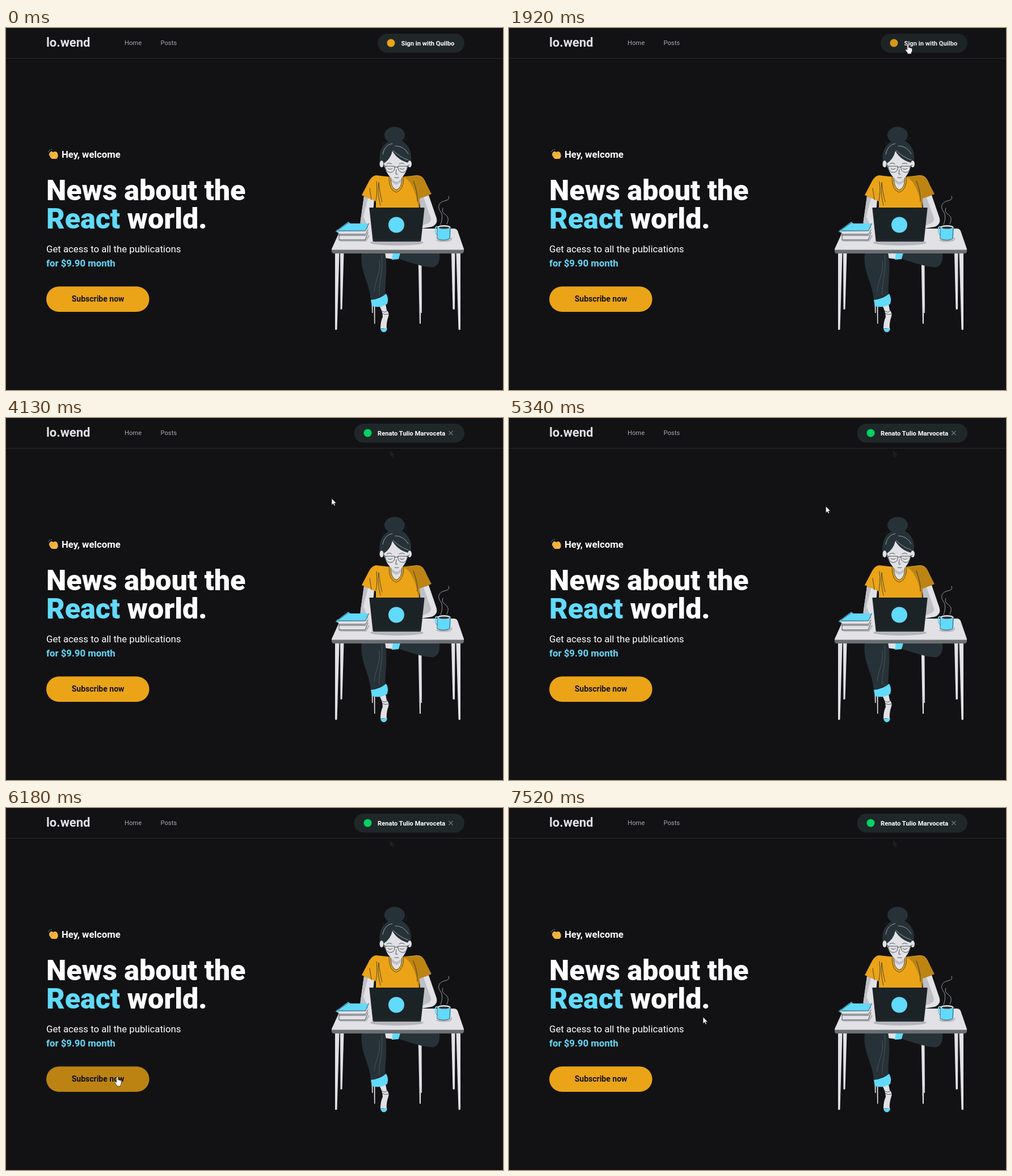
Recreate the animation shown at these times as an HTML page. Size 876 px wide and 639 px high, loop 8 s.

```html
<!DOCTYPE html>
<html lang="en">
<head>
<meta charset="utf-8">
<title>News landing page</title>
<style>
html, body { margin: 0; height: 100%; overflow: hidden; background: #121214; }
svg { display: block; width: 876px; height: 639px; font-family: Roboto, sans-serif; }
.b { font-weight: 700; }
.skin { fill: #e1e1e6; }
.shade { fill: #bfc0c5; }
.dark { fill: #263238; }
.gold { fill: #eba417; }
.ochre { fill: #bd8413; }
.cyan { fill: #61dafb; }
.ink { fill: none; stroke: #263238; stroke-width: .8; stroke-linecap: round; stroke-linejoin: round; }
.pale { fill: none; stroke: #b4babe; stroke-width: .8; stroke-linecap: round; }
</style>
</head>
<body>
<svg viewBox="0 0 876 639">
  <defs>
    <path id="arrowShape" d="M0 0V11.6L2.7 9.1 4.5 13 6.3 12.2 4.6 8.4H8.2Z"/>
  </defs>

  <!-- Header -->
  <path d="M0 53.5H876" stroke="#29292e"/>
  <text x="71" y="33" font-size="22" class="b" fill="#e1e1e6">lo.wend</text>
  <g font-size="11.2" fill="#a8a8b3">
    <text x="209" y="30">Home</text>
    <text x="272.5" y="30">Posts</text>
  </g>
  <g id="signIn" class="b" font-size="11.2" fill="#fff">
    <rect x="655" y="10" width="153" height="33.4" rx="16.7" fill="#1f2729"/>
    <circle cx="678.5" cy="26.5" r="7" class="gold"/>
    <text x="696.5" y="30.8">Sign in with Quilbo</text>
  </g>
  <g id="account" class="b" font-size="11.2" fill="#fff">
    <rect x="613.5" y="10" width="194.5" height="33.4" rx="16.7" fill="#1f2729"/>
    <circle cx="637.5" cy="26.5" r="7" fill="#04d361"/>
    <text x="655" y="30.8">Renato Tulio Marvoceta</text>
    <path d="M780.5 23l7 7m0-7l-7 7" stroke="#737380" stroke-width="1.3"/>
  </g>

  <!-- Hero copy -->
  <path d="M78 219q1-2 3-1l2 1 3-1q4 0 5 4 2 6-2 9H81q-3-2-4-5-2-2-1-3 0-3 2-4z" fill="#f5b63f"/>
  <path d="M77 223l5 4m-4-7l6 5m-2-6l5 4" stroke="#d98e2b" stroke-width=".8"/>
  <path d="M74.500 219l1.500-2m0-1l2-1m1 0l2-.5" stroke="#4f9bd8"/>
  <g fill="#fff">
    <text x="98" y="229" font-size="16.75" class="b">Hey, welcome</text>
    <g font-size="50.2" font-weight="900">
      <text x="71" y="304">News about the</text>
      <text x="71" y="354"><tspan class="cyan">React</tspan> world.</text>
    </g>
    <text x="71" y="396" font-size="16.75">Get acess to all the publications</text>
    <text x="71" y="421" font-size="16.75" class="b cyan">for $9.90 month</text>
  </g>
  <g id="subscribe">
    <rect x="71" y="456.3" width="181.5" height="44.7" rx="22.35" class="gold"/>
    <text x="115.7" y="483.3" font-size="14" class="b" fill="#121214">Subscribe now</text>
  </g>

  <!-- Legs, chair and table legs -->
  <g class="skin">
    <path d="M726.500 400h5.500l-1 122h-2zM730 416h2.500l.5 87h-1.500zM644.500 487h2v16h-1.500zM648.500 487h2v35h-1.500z"/>
    <path d="M580 397h7.500l-4 135q-2 2-3.500 0zM589 397h6.500l-3 99q-2 2-3 0zM785 397h6.500l-.5 99q-2 2-3.500 0zM793.500 397h7.500v135q-2 2-3.500 0z"/>
    <path d="M667 397h16l-1 11-14-2zM658 490l11-3 2 11q5 5 3 11-4 12-3 22l-11-1q0-12 4-20 0-9-6-20z"/>
  </g>
  <path d="M686 397h78q2 21-10 25-13 2-60-14z" class="dark"/>
  <path d="M682 397h13l-3 11-12 1z" class="cyan"/>
  <path d="M627 397h41c6 28-1 55 1 74l-26 10c-2-32-20-51-16-84z" class="dark"/>
  <path d="M662 401c4 28-6 50-4 70m-9-6c2-22 12-32 9-54" class="pale" opacity=".3"/>
  <path d="M643 480q17-2 27-11 5 8 2 18-11 8-27 4z" class="cyan"/>
  <path d="M662 499q6 5 10 0m-9 5q5 3 11 1" class="ink"/>
  <path d="M660 530q6 2 12 0-1 7-6 7t-6-7z" class="cyan"/>

  <!-- Arms and shirt -->
  <path d="M631 297l18 7-5 50-12 0q-9-2-7-15z" class="skin"/>
  <path d="M631 297l7 3-8 33 9 21-7 0q-9-2-7-15z" class="shade"/>
  <path d="M729 301l16-6 13 38q5 13-8 18l-18 3z" class="skin"/>
  <path d="M729 301l7-2 12 34q4 8-5 12l-10 4z" class="shade"/>
  <path d="M652 260q-7 1-12 10l-13 25 25 11v14h76l1-19 20-8-11-24q-5-10-15-9l-35 4z" class="gold"/>
  <path d="M700 263l23-2q10-1 15 9l12 23-21 8-2 17q-2-23-13-42-5-9-14-13z" class="ochre"/>
  <path d="M657 273q-3 17 3 40m-7-42q2 20-1 34m-11-22l3 20m13-30q2 20 6 34m55-37q8 20 7 36" class="ink"/>
  <path d="M678 257h20q1 25-10 28-12-4-10-28z" class="skin"/>
  <path d="M678 260q10 20 20 0l-1 12-9 5-9-5z" class="shade"/>
  <path d="M675 263q0 24 13 27 13-4 13-27m-23 0q0 20 10 23 10-3 10-23" class="ink"/>

  <!-- Head -->
  <ellipse cx="685" cy="189" rx="18" ry="14.500" class="dark"/>
  <path d="M659 238c-4-24 10-41 28-41s31 19 26 41l-9 8h-37z" class="dark"/>
  <ellipse cx="662" cy="240" rx="3.500" ry="6" class="skin"/>
  <ellipse cx="711.500" cy="240" rx="3.500" ry="6" class="skin"/>
  <path d="M681 217q9 16 28 21-1 18-18 33h-5q-17-12-20-32 12-8 15-22z" class="skin"/>
  <path d="M682 216q12 12 27 17m-23-25q15 0 23 14m-45 1q3-17 17-19" class="pale"/>
  <path d="M703 198q4 2 3-5M668 202q-4-1-4 4" class="ink"/>
  <g class="ink">
    <path d="M669 244h16v4q-1 7-8 7-7-1-8-7zM691 244h16v4q-2 7-8 7-7-1-8-7zM685 246q3-2 6 0M665 242l4 2m38 0l4-2"/>
    <path d="M673 248q4 3 8 0m13 0q4 3 8 0M688 250l-1 8 3 0m-5 6q4 1 7 0M671 240q5-3 9 0m13 0q5-3 9 0"/>
  </g>

  <!-- Table and objects -->
  <path d="M595 354h194q5 0 7 4l11 32v3H574v-3l14-31q2-5 7-5z" class="skin"/>
  <path d="M574 391.500h233v3q-1 3.500-4 3.500H578q-4 0-4-4z" fill="#6b6f73"/>
  <ellipse cx="689" cy="379" rx="47" ry="5" fill="#b5b6bb"/>
  <path d="M585 374h48l6-9 2 2-6 10h-45zM757 374h25l4-5q2 7-8 8-16 2-21-3z" fill="#b5b6bb"/>
  <path d="M587 361h51l-5 13h-46zM583 356h54l-3 8h-48z" class="skin"/>
  <path d="M587 365v9h46l5-13M587 366h47m-50-7l3 5h47l4-8" class="ink"/>
  <path d="M580.500 359l23-17 3 3h33l-6 13-46 1-3 2z" class="cyan"/>
  <path d="M580.500 360l24-17m-18 15h47l6-13" class="ink"/>
  <path d="M641 317h95.500q1.500 0 1 2l-6 56q0 2-2 2h-81q-2 0-2-2l-6-56q-.5-2 .5-2z" fill="#1b2326"/>
  <path d="M646 375h85" stroke="#353f44" stroke-width=".8"/>
  <circle cx="688" cy="347.500" r="14" class="cyan"/>
  <path d="M762 351h-3q-2 0-2 3v7q1 4 5 4" fill="none" stroke="#61dafb" stroke-width="2"/>
  <path d="M760 351h24l-1 21q-11 5-22 0z" class="cyan"/>
  <ellipse cx="772" cy="351.500" rx="11.500" ry="3.500" class="skin"/>
  <ellipse cx="772" cy="352.500" rx="9.500" ry="2" class="dark"/>
  <path d="M760 352v20q11 5 22 0l1-20" class="ink"/>
  <path d="M780 297q3 6-6 8c-12 2-14 12-8 19 4 6 3 15 0 23m4-29q-3 7 4 11 9 6 3 17" class="pale"/>

  <!-- Pointer -->
  <use id="trace" href="#arrowShape" x="677" y="57" fill="#202023" stroke="#1a1a1c"/>
  <g id="pointer" stroke="#222" stroke-width=".7" stroke-linejoin="round">
    <use id="arrow" href="#arrowShape" fill="#fff"/>
    <path id="hand" fill="#fff" d="M-1.300 1Q0-.8 1.300 1V6q1.500-1 2.200.4 1.600-.7 2 .7 1.500-.6 2 1v4l-1.500 3v1.900H-.7v-1.700L-4.300 10.300Q-4.400 8.300-2.700 9l1.400 1.400z"/>
  </g>
</svg>
<script>
const LOOP = 8000, STEP = 70;
const el = id => document.getElementById(id);
const clamp = v => Math.min(1, Math.max(0, v));
const ease = p => p * p * (3 - 2 * p);
const show = (id, on) => { el(id).style.display = on ? "" : "none"; };

// Pointer route: time, x, y
const route = [
  [330, 689, 478], [1090, 330, 154], [1370, 658, 107], [1570, 658, 107],
  [1850, 703, 29], [2190, 704, 26], [3180, 704, 26], [3250, 677, 57],
  [3530, 574, 142], [5270, 574, 142], [5830, 210, 464], [6110, 196, 474],
  [7030, 196, 474], [7520, 342, 369]
];

function pointerAt(t) {
  const next = route.findIndex(k => k[0] > t);
  if (next < 0) return route[route.length - 1].slice(1);
  if (next === 0) return route[0].slice(1);
  const [t0, x0, y0] = route[next - 1], [t1, x1, y1] = route[next];
  const p = ease(Math.floor((t - t0) / STEP) * STEP / (t1 - t0));
  return [x0 + (x1 - x0) * p, y0 + (y1 - y0) * p];
}

// Hover darkens a button over 200 ms
function hover(id, t, enter, leave) {
  const amount = clamp((t - enter) / 200) - clamp((t - leave) / 200);
  el(id).style.filter = amount ? `brightness(${1 - 0.2 * amount})` : "none";
}

function draw(t) {
  const [x, y] = pointerAt(t), signedIn = t >= 4130;
  const overSignIn = x > 655 && y > 10 && y < 43;
  const overSubscribe = x > 71 && x < 252 && y > 456 && y < 501;
  const isHand = overSignIn || overSubscribe;
  el("pointer").setAttribute("transform", `translate(${x} ${y})`);
  show("pointer", t >= 330);
  show("hand", isHand);
  show("arrow", !isHand);
  show("trace", t >= 3320);
  show("signIn", !signedIn);
  show("account", signedIn);
  hover("signIn", t, 1850, 3250);
  hover("subscribe", t, 5800, 7170);
}

const start = performance.now();
function tick() {
  draw((performance.now() - start) % LOOP);
  requestAnimationFrame(tick);
}
tick();
</script>
</body>
</html>
```
